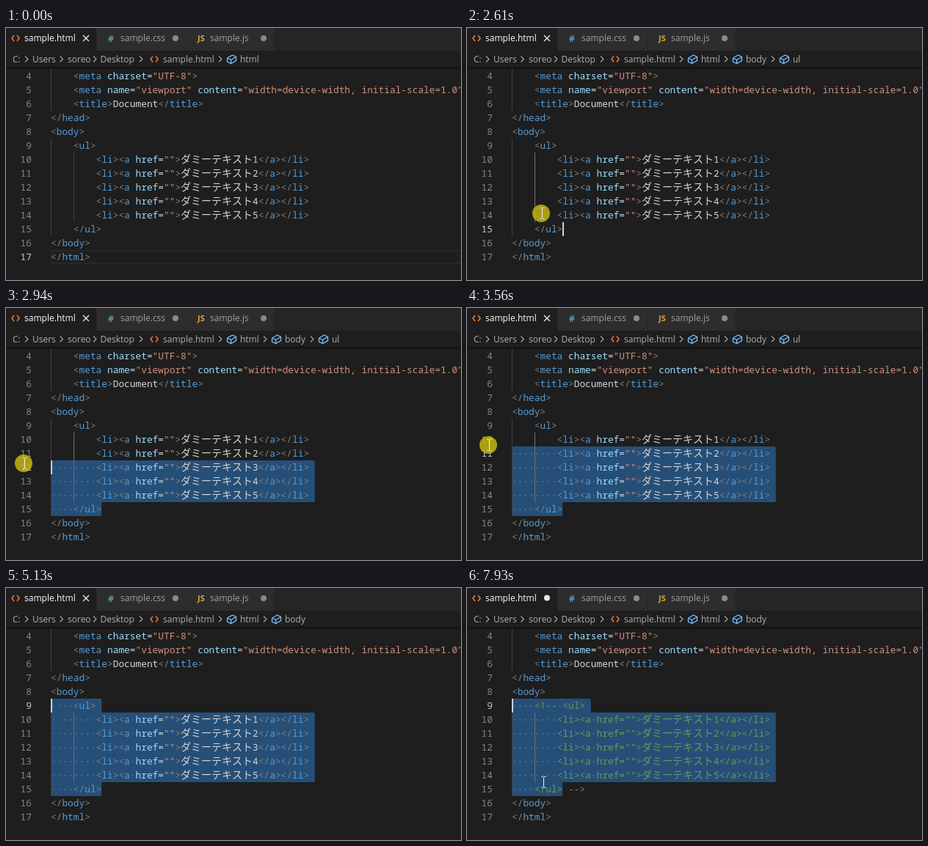
An HTML page with a canvas that plays this animation: 620 px wide and 344 px high, repeating every 8 s.

```html
<!DOCTYPE html>
<html lang="ja">
<head>
<meta charset="UTF-8">
<title>Editor</title>
<style>
html, body { margin: 0; width: 100%; height: 100%; overflow: hidden; background: #1e1e1e; }
canvas { display: block; width: 620px; height: 344px; }
</style>
</head>
<body>
<canvas id="stage" width="620" height="344"></canvas>
<script>
const ctx = document.getElementById('stage').getContext('2d', { alpha: false });
const LOOP = 8000, STEP = 1000 / 15;
const LEFT = 61, CHAR = 7.7, WIDE = 14, ROW = 19, TOP = 56, FIRST = 4;
const MONO = '500 12.833px "Noto Sans Mono", monospace';
const KANA = '14px "Noto Sans CJK JP", "Noto Sans CJK", sans-serif';
const UI = '12px "Open Sans", "Noto Sans", sans-serif';
const PRESS = 2405, RELEASE = 4310, COMMENT = 6585;
const ANCHOR = { row: 15, col: 9 };

const items = [1, 2, 3, 4, 5].map(n => `        <li><a href="">ダミーテキスト${n}</a></li>`);
const lines = [
  '    <meta charset="UTF-8">',
  '    <meta name="viewport" content="width=device-width, initial-scale=1.0">',
  '    <title>Document</title>',
  '</head>', '<body>', '    <ul>', ...items, '    </ul>', '</body>', '</html>'
];
const commented = lines.map(s => s.replace('    <ul>', '    <!-- <ul>').replace('    </ul>', '    </ul> -->'));

// Pointer strokes: [time, x, y]
const strokes = [
  [[925, 112, 331], [990, 112, 331]],
  [[1265, 144, 243], [1660, 132, 270], [1870, 132, 270], [2060, 149, 270], [2400, 149, 270],
   [2530, 138, 268], [2665, 69, 239], [2730, 51, 232], [2870, 30, 217], [3000, 19, 206],
   [3200, 15, 198], [3467, 28, 190], [3530, 30, 187], [3750, 32, 177], [3800, 32, 177],
   [3990, 33, 168], [4300, 36, 161], [4460, 36, 161], [5060, -8, 148]],
  [[7530, 59, 286], [7660, 147, 274], [7800, 120, 266], [7930, 104, 265], [8000, 104, 265]]
];
const blinkOff = [[3540, 3660], [4600, 5125], [5665, 6125], [7055, 7535]];

function pointerAt(t) {
  for (const path of strokes) {
    for (let i = 1; i < path.length; i++) {
      const [t0, x0, y0] = path[i - 1], [t1, x1, y1] = path[i];
      if (t < t0 || t > t1) continue;
      const k = (t - t0) / (t1 - t0);
      return { x: Math.round(x0 + (x1 - x0) * k), y: Math.round(y0 + (y1 - y0) * k) };
    }
  }
  return null;
}

// The selection trails the pointer by one step
function caretAt(t, q) {
  if (t < PRESS) return null;
  const p = pointerAt(Math.max(2400, Math.min(q - STEP, 4300)));
  const row = Math.floor((p.y - TOP) / ROW) + FIRST;
  const limit = row === ANCHOR.row ? ANCHOR.col : 8;
  const col = Math.round((p.x - LEFT) / CHAR);
  return { row, col: Math.max(0, Math.min(limit, col)) };
}

const rowTop = row => TOP + (row - FIRST) * ROW;
const isWide = c => c.charCodeAt(0) > 0x2fff;
const widthOf = s => [...s].reduce((w, c) => w + (isWide(c) ? WIDE : CHAR), 0);

function rect(x, y, w, h, color) {
  ctx.fillStyle = color;
  ctx.fillRect(x, y, w, h);
}
function text(s, x, y, color, font) {
  ctx.font = font;
  ctx.fillStyle = color;
  ctx.fillText(s, x, y);
}
function disc(x, y, r, color) {
  ctx.fillStyle = color;
  ctx.beginPath();
  ctx.arc(x, y, r, 0, Math.PI * 2);
  ctx.fill();
}
function stroke(color, width, ...polys) {
  ctx.strokeStyle = color;
  ctx.lineWidth = width;
  ctx.beginPath();
  for (const pts of polys) pts.forEach(([x, y], i) => i ? ctx.lineTo(x, y) : ctx.moveTo(x, y));
  ctx.stroke();
}

function angles(x, y) {
  stroke('#e37933', 1.6,
    [[x - 2, y - 4], [x - 5, y], [x - 2, y + 4]],
    [[x + 2, y - 4], [x + 5, y], [x + 2, y + 4]]);
}
function chevron(x, y) {
  stroke('#a9a9a9', 1.1, [[x - 2, y - 4], [x + 2, y], [x - 2, y + 4]]);
}
function cube(x, y) {
  stroke('#75beff', 1.3,
    [[x - 6, y - 1.5], [x + 1, y - 5.5], [x + 6, y - 3], [x + 6, y + 2], [x - 1, y + 6], [x - 6, y + 3.5], [x - 6, y - 1.5]],
    [[x - 6, y - 1.5], [x - 1, y + 1], [x + 6, y - 3]],
    [[x - 1, y + 1], [x - 1, y + 6]]);
}

function drawTabs(edited) {
  rect(0, 0, 620, 31, '#252526');
  rect(0, 0, 123, 31, '#1e1e1e');
  rect(124, 0, 121, 31, '#2d2d2d');
  rect(246, 0, 119, 31, '#2d2d2d');
  angles(13, 14);
  text('sample.html', 25, 18, '#ffffff', UI);
  text('#', 139, 18.5, '#519aba', 'bold 13px "Noto Sans Mono", monospace');
  text('sample.css', 156, 18, '#a0a0a0', UI);
  text('JS', 261, 18, '#d9a23b', 'bold 11px "Open Sans", sans-serif');
  text('sample.js', 278, 18, '#a0a0a0', UI);
  disc(231, 14, 4, '#8a8a8a');
  disc(351, 14, 4, '#8a8a8a');
  if (edited) disc(109, 13.5, 4, '#e8e8e8');
  else stroke('#e8e8e8', 1.4, [[105, 10], [113, 18]], [[113, 10], [105, 18]]);
}

function drawCrumbs(depth) {
  const crumb = (s, x) => text(s, x, 46.5, '#b0b0b0', UI);
  crumb('C:', 9);
  crumb('Users', 36);
  crumb('soreo', 84);
  crumb('Desktop', 128.5);
  crumb('sample.html', 214);
  [28, 75.5, 121, 184].forEach(x => chevron(x, 42.5));
  angles(202, 42.5);
  [['html', 319], ['body', 380], ['ul', 444]].slice(0, depth).forEach(([s, x]) => {
    chevron(x - 27, 42.5);
    cube(x - 11.5, 42.5);
    crumb(s, x);
  });
}

function drawSelection(caret, source) {
  for (let row = caret.row; row <= ANCHOR.row; row++) {
    const s = source[row - FIRST], y = rowTop(row);
    const first = row === caret.row, last = row === ANCHOR.row;
    const from = first ? caret.col : 0;
    const x0 = LEFT + from * CHAR;
    const x1 = LEFT + (last ? ANCHOR.col * CHAR : widthOf(s) + CHAR);
    if (x1 <= x0) continue;
    const top = first ? 3 : 0, bottom = last ? 3 : 0;
    ctx.fillStyle = '#264f78';
    ctx.beginPath();
    ctx.roundRect(x0, y, x1 - x0, ROW, [top, top, bottom, bottom]);
    ctx.fill();
    let x = LEFT;
    [...s].forEach((c, i) => {
      if (c === ' ' && i >= from && !(last && i >= ANCHOR.col)) disc(x + CHAR / 2, y + 10, 0.9, 'rgba(227,228,226,0.28)');
      x += isWide(c) ? WIDE : CHAR;
    });
  }
}

function drawGuides(active) {
  const line = (x, a, b, color) => rect(x, rowTop(a), 1, (b - a + 1) * ROW, color);
  rect(LEFT, 53, 1, 3, '#404040');
  line(LEFT, 4, 6, '#404040');
  line(LEFT, 9, 15, '#404040');
  line(92, 10, 14, active ? '#707070' : '#404040');
}

function drawScrollShadow() {
  const fade = ctx.createLinearGradient(0, 53, 0, 57);
  fade.addColorStop(0, 'rgba(0,0,0,0.5)');
  fade.addColorStop(1, 'rgba(0,0,0,0)');
  rect(0, 53, 620, 4, fade);
}

function drawLine(s, y, flat) {
  let x = LEFT, prev = '';
  for (const { 0: token, index } of s.matchAll(/"[^"]*"|<\/?|>|=|\w+|[^<>"=\w]+/g)) {
    let color = '#d4d4d4';
    if (/^[<>]/.test(token)) color = '#808080';
    else if (token[0] === '"') color = '#ce9178';
    else if (prev[0] === '<') color = '#569cd6';
    else if (s[index + token.length] === '=') color = '#9cdcfe';
    if (token.trim()) text(token, x, y, flat ? '#6a9955' : color, isWide(token) ? KANA : MONO);
    x += widthOf(token);
    prev = token;
  }
}

function drawPointer(p, pressed) {
  if (pressed) disc(p.x - 1, p.y, 12, 'rgba(190,178,18,0.88)');
  const x = p.x + 0.5, top = p.y - 7.5, bottom = p.y + 7.5;
  const serif = (y, dy) => [[x - 3, y], [x - 1, y], [x, y + dy], [x + 1, y], [x + 3, y]];
  stroke('#f0f0f0', 1, [[x, top + 1], [x, bottom - 1]], serif(top, 1), serif(bottom, -1));
}

function draw(t) {
  const q = Math.floor((t + 10) / STEP) * STEP;
  const edited = t >= COMMENT;
  const source = edited ? commented : lines;
  const caret = caretAt(t, q);
  const row = caret ? caret.row : 17;

  rect(0, 0, 620, 344, '#1e1e1e');
  drawTabs(edited);
  drawCrumbs(!caret ? 1 : row === 9 ? 2 : 3);

  if (caret) drawSelection(caret, source);
  else {
    ctx.strokeStyle = '#282828';
    ctx.lineWidth = 2;
    ctx.strokeRect(LEFT + 1, rowTop(17) + 1, 600, ROW - 2);
  }
  drawGuides(!!caret);

  source.forEach((s, i) => {
    const n = i + FIRST, y = rowTop(n) + 14;
    const label = String(n);
    text(label, 35 - label.length * CHAR, y, n === row ? '#c6c6c6' : '#858585', MONO);
    drawLine(s, y, edited && n >= 9 && n <= 15);
  });
  drawScrollShadow();

  if (caret && !blinkOff.some(([a, b]) => t >= a && t < b)) {
    rect(Math.round(LEFT + caret.col * CHAR), rowTop(row), 2, ROW, '#d0d0ce');
  }
  const p = pointerAt(q);
  if (p) drawPointer(p, t >= PRESS && t < RELEASE);
}

const start = performance.now();
function tick() {
  draw((performance.now() - start) % LOOP);
  requestAnimationFrame(tick);
}
tick();
</script>
</body>
</html>
```
